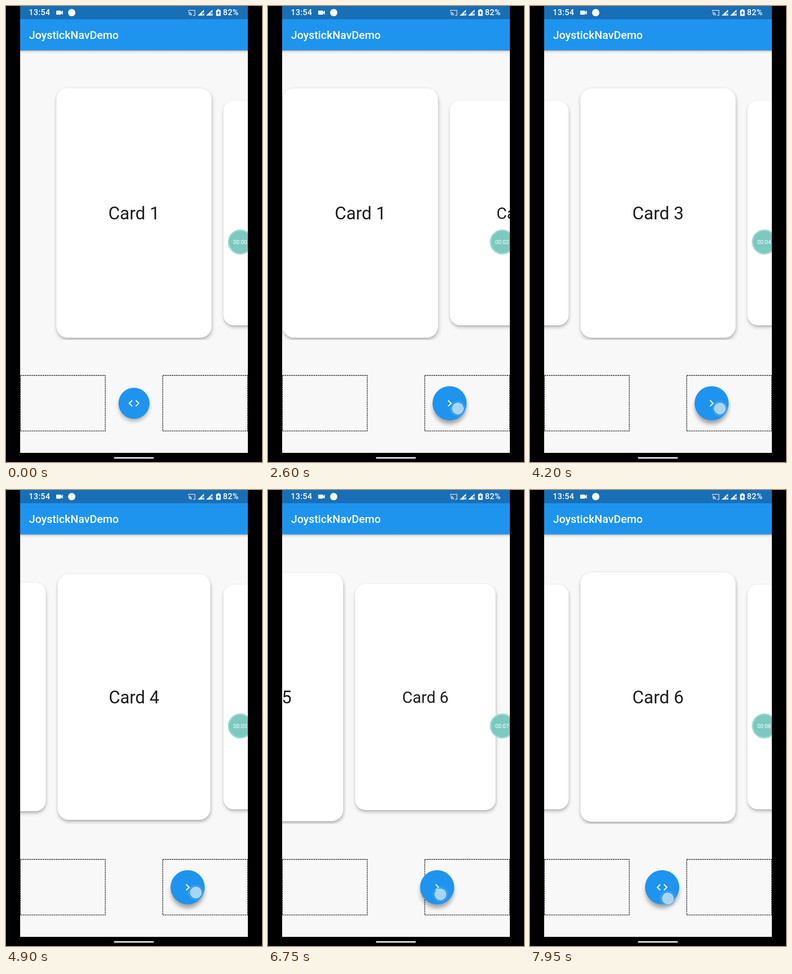
Recreate the animation shown at these times as an HTML page. Size 561x998 px, loop 8 s.

```html
<!DOCTYPE html>
<html lang="en">
<head>
<meta charset="utf-8">
<title>JoystickNavDemo</title>
<style>
  html, body { margin: 0; width: 100%; height: 100%; overflow: hidden; background: #000; }
  svg { display: block; width: 100vw; height: 100vh; }
  text { font-family: Roboto, "Liberation Sans", sans-serif; }
  .mid { text-anchor: middle; }
  .status { font-size: 17.5px; font-weight: 500; letter-spacing: .5px; }
  .dash { fill: none; stroke: #111; stroke-width: 1.3; stroke-dasharray: 3.64 1.21; }
</style>
</head>
<body>
<svg viewBox="0 0 561 998" xmlns="http://www.w3.org/2000/svg">
  <defs>
    <clipPath id="screen"><rect x="31" width="499" height="978"/></clipPath>
    <clipPath id="pager"><rect x="31" y="170" width="499" height="561"/></clipPath>
    <filter id="cardShadow" x="-10%" y="-10%" width="120%" height="120%">
      <feDropShadow dx="0" dy="1" stdDeviation="2" flood-color="#000" flood-opacity=".14"/>
      <feDropShadow dx="1" dy="5" stdDeviation="4" flood-color="#000" flood-opacity=".24"/>
    </filter>
    <filter id="blur" x="-40%" y="-40%" width="180%" height="180%">
      <feGaussianBlur stdDeviation="5"/>
    </filter>
    <linearGradient id="barShadow" x2="0" y2="1">
      <stop stop-color="#000" stop-opacity=".3"/>
      <stop offset=".4" stop-color="#000" stop-opacity=".09"/>
      <stop offset="1" stop-color="#000" stop-opacity="0"/>
    </linearGradient>
  </defs>
  <rect width="561" height="998"/>
  <g clip-path="url(#screen)">
    <rect x="31" width="499" height="978" fill="#f7f8f7"/>
    <g id="cards" clip-path="url(#pager)"></g>
    <rect x="31" y="97" width="499" height="7" fill="url(#barShadow)"/>
    <rect x="31" y="28" width="499" height="69" fill="#1f94ef"/>
    <rect x="31" width="499" height="29" fill="#186fb6"/>
    <text x="50.5" y="72" font-size="24.2" font-weight="500" fill="#fff">JoystickNavDemo</text>

    <g fill="#fff">
      <text class="status" x="50" y="20">13:54</text>
      <path d="M111 10h8.500q1 0 1 1v2.300l4-3.500v9.400l-4-3.500v2.300q0 1-1 1h-8.500q-1 0-1-1v-7q0-1 1-1z"/>
      <circle cx="144" cy="14.500" r="8"/>
      <g fill="none" stroke="#fff" stroke-width="1.500">
        <path d="M400 12v-2.500h14v11h-4" stroke="#eed9d4"/>
        <path d="M400 14a6.500 6.500 0 0 1 6.500 6.500M400 17a3.500 3.500 0 0 1 3.500 3.500"/>
      </g>
      <path id="signal" d="M420 21L434 8v6h-4v7z"/>
      <path d="M430.500 16.500l4 4.500m0-4.500l-4 4.500" stroke="#fff" stroke-width="1.300"/>
      <g transform="translate(18.500)">
        <path d="M420 21L434 8v6h-4v7z"/>
        <path d="M430.500 16.500l4 4.500m0-4.500l-4 4.500" stroke="#fff" stroke-width="1.300"/>
      </g>
      <path d="M463.500 7h4v1.700h2q1 0 1 1v11q0 1-1 1h-8q-1 0-1-1v-11q0-1 1-1h2z"/>
      <path d="M466.300 10l-3.800 6h2.500v4l3.700-6h-2.400z" fill="#186fb6"/>
      <text class="status" x="475.500" y="20">82%</text>
    </g>

    <rect class="dash" x="31.500" y="808.500" width="186" height="121.700"/>
    <rect class="dash" x="343.500" y="808.500" width="186" height="121.700"/>

    <g id="stick">
      <circle id="shade" fill="#000" filter="url(#blur)"/>
      <circle id="knob" fill="#1f94ef"/>
      <path id="icon" fill="#fff" transform="scale(1.213) translate(-12 -12)"/>
    </g>
    <g id="touch">
      <circle r="17" fill="#55aff2" opacity=".4"/>
      <circle r="12.500" fill="#b9dcf8" opacity=".88"/>
      <circle r="12" fill="none" stroke="#d2e9fb" opacity=".7"/>
    </g>

    <circle cx="513.500" cy="516.500" r="26" fill="#7bc9bf" stroke="#a8dad3" stroke-width="3"/>
    <text id="clock" class="mid" x="513" y="521" font-size="12.100" fill="#fff"></text>
  </g>
  <rect x="236.500" y="987.500" width="87.500" height="3" rx="1.500" fill="#fff"/>
</svg>
<script>
const LOOP = 8000, PITCH = 349, CENTER = 280.5, CARD_Y = 453;
const FIRST_TURN = 2470, TURN_EVERY = 1000, TURNS = 5;
const ICONS = {
  both: "M9.4 16.6L4.8 12l4.600-4.600L8 6l-6 6 6 6 1.400-1.400zm5.200 0l4.600-4.600-4.600-4.600L16 6l6 6-6 6-1.400-1.400z",
  next: "M10 6L8.590 7.410 13.170 12l-4.580 4.590L10 18l6-6z"
};
const $ = id => document.getElementById(id);
const clamp = v => Math.min(1, Math.max(0, v));
const lerp = (a, b, p) => a + (b - a) * p;
const outQuint = p => 1 - (1 - clamp(p)) ** 5;

// cubic-bezier(.42, 0, .58, 1)
function easeInOut(x) {
  x = clamp(x);
  let lo = 0, hi = 1;
  for (let i = 0; i < 24; i++) {
    const s = (lo + hi) / 2, r = 1 - s;
    if (3 * r * r * s * .42 + 3 * r * s * s * .58 + s ** 3 < x) lo = s; else hi = s;
  }
  return lo * lo * (3 - 2 * lo);
}

// finger path: time, x, y
const PATH = [
  [1150, 294, 884], [1300, 312, 884], [1500, 358, 883], [1750, 398, 882],
  [1950, 412, 881], [2200, 416, 881], [6350, 416, 881], [6500, 406, 882],
  [6750, 378, 885], [7000, 353, 888], [7250, 332, 890], [7600, 311, 893], [7950, 302, 894]
];
function finger(t) {
  if (t <= PATH[0][0]) return PATH[0].slice(1);
  const n = PATH.findIndex(p => p[0] > t);
  if (n < 0) return PATH[PATH.length - 1].slice(1);
  const a = PATH[n - 1], b = PATH[n], p = (t - a[0]) / (b[0] - a[0]);
  return [lerp(a[1], b[1], p), lerp(a[2], b[2], p)];
}

const turnAt = n => FIRST_TURN + TURN_EVERY * n;
const slide = (n, t) => n < TURNS ? easeInOut((t - turnAt(n)) / 400) : 0;
const focus = (n, t) => n < 0 ? 1 : n < TURNS ? outQuint((t - turnAt(n) - 275) / 500) : 0;

const cards = Array.from({ length: 7 }, (_, i) => {
  const g = document.createElementNS("http://www.w3.org/2000/svg", "g");
  g.innerHTML = `<rect x="-170" y="-273" width="340" height="546" rx="25" fill="#fefffe" filter="url(#cardShadow)"/>
    <text class="mid" y="14" font-size="38.800" fill="#1d1d1d">Card ${i + 1}</text>`;
  $("cards").append(g);
  return g;
});

function draw(t) {
  let page = 0;
  for (let n = 0; n < TURNS; n++) page += slide(n, t);
  cards.forEach((g, i) => {
    const x = CENTER + (i - page) * PITCH;
    const scale = .9 + .1 * (focus(i - 1, t) - focus(i, t));
    g.style.display = x > -170 && x < 730 ? "" : "none";
    g.setAttribute("transform", `translate(${x} ${CARD_Y}) scale(${scale})`);
  });

  const press = easeInOut((t - 800) / 180);
  const stickX = t < 1150 ? CENTER : Math.min(398, Math.max(CENTER, finger(t - 60)[0] - 14));
  const r = lerp(34, 37.5, press);
  $("stick").setAttribute("transform", `translate(${stickX} 869.5)`);
  $("knob").setAttribute("r", r);
  $("shade").setAttribute("r", r - 1);
  $("shade").setAttribute("cy", lerp(6, 9, press));
  $("shade").setAttribute("opacity", lerp(.3, .34, press));
  $("icon").setAttribute("d", stickX > 343 ? ICONS.next : ICONS.both);

  const [x, y] = finger(t);
  $("touch").setAttribute("transform", `translate(${x} ${y})`);
  $("touch").setAttribute("opacity", t < 800 ? 0 : 1);
  $("clock").textContent = "00:0" + Math.floor((t + 350) / 1000);
}

const start = performance.now();
function tick() {
  draw((performance.now() - start) % LOOP);
  requestAnimationFrame(tick);
}
draw(0);
tick();
</script>
</body>
</html>
```
